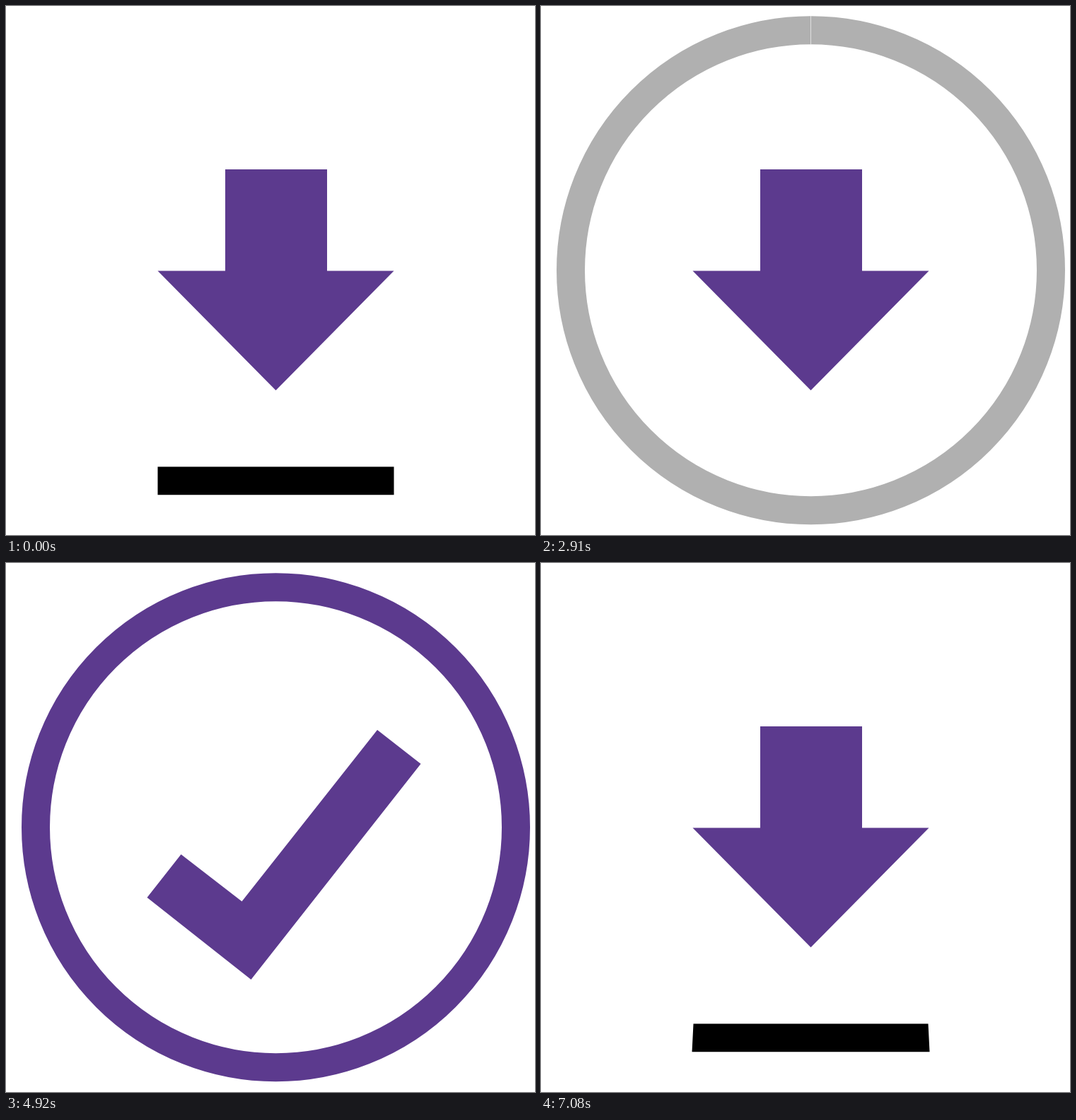
Animation, 748 px wide and 748 px high, one loop 7440 ms. Source, as an HTML page with a canvas:

```html
<!DOCTYPE html>
<html lang="en">
<head>
<meta charset="utf-8">
<title>Download</title>
<style>
  html, body { margin: 0; width: 100%; height: 100%; overflow: hidden; background: #fff; }
  canvas { display: block; }
</style>
</head>
<body>
<canvas width="748" height="748"></canvas>
<script>
const ctx = document.querySelector('canvas').getContext('2d');
const LOOP = 7440, STEP = 30;
const CX = 381.5, CY = 373.7, RADIUS = 339.5, WEIGHT = 40;
const PURPLE = '#5c3a8e', GRAY = 176;

const arrow = new Path2D('M310 231H454V374.5H548.5L381.5 543.5L214.5 374.5H310Z');
const check = new Path2D('M525 213.5L586.5 261.5L346.5 566.5L199.5 450.5L247.5 389.5L333.5 456Z');
const inside = new Path2D();
inside.arc(CX, CY, RADIUS - WEIGHT / 2, 0, 7);

const lerp = (a, b, p) => a + (b - a) * p;
const span = (t, from, to) => Math.min(1, Math.max(0, (t - from) / (to - from)));
const quadIn = p => p * p;
const quadOut = p => 1 - (1 - p) ** 2;
const quadInOut = p => p < .5 ? 2 * p * p : 1 - 2 * (1 - p) ** 2;
const backIn = (p, s) => p * p * ((s + 1) * p - s);
const backOut = (p, s) => 1 - backIn(1 - p, s);

function icon(path, y) {
  ctx.save();
  ctx.clip(inside);
  ctx.translate(0, y);
  ctx.fillStyle = PURPLE;
  ctx.fill(path);
  ctx.restore();
}

// Angles in degrees, clockwise from the bottom of the ring
function ring(color, from, to) {
  const rad = a => (a + 90) * Math.PI / 180;
  ctx.strokeStyle = color;
  ctx.lineWidth = WEIGHT;
  ctx.beginPath();
  ctx.arc(CX, CY, RADIUS, rad(from), rad(to));
  ctx.stroke();
}

// A straight bar at bend 0, a slice of the ring at bend 1
function bar(color, bend, flare = 0) {
  const edge = (half, endY, midY) => {
    const sag = Math.max(.01, midY - endY);
    return { half, endY, r: (half * half + sag * sag) / (2 * sag) };
  };
  const inner = edge(lerp(167, 187.8, bend) - flare, lerp(651.5, 632.2, bend), lerp(651.5, 693.2, bend));
  const outer = edge(lerp(167, 211.3, bend) + flare, lerp(691.3, 664.5, bend), lerp(691.3, 733.2, bend));
  ctx.fillStyle = color;
  ctx.fill(new Path2D(
    `M${CX - inner.half} ${inner.endY}A${inner.r} ${inner.r} 0 0 0 ${CX + inner.half} ${inner.endY}` +
    `L${CX + outer.half} ${outer.endY}A${outer.r} ${outer.r} 0 0 1 ${CX - outer.half} ${outer.endY}Z`));
}

function drawIcons(t) {
  if (t < 4170) {
    const press = t < 1090
      ? 150 * backIn(span(t, 330, 1090), 2.4)
      : 150 * (1 - quadInOut(span(t, 1090, 1580)));
    icon(arrow, press);
    return press;
  }
  if (t < 4620) icon(arrow, 500 * backIn(span(t, 4170, 4590), 1.08));
  else if (t < 5520) icon(check, -580 * (1 - backOut(span(t, 4680, 5170), 1.345)));
  else if (t < 6390) icon(check, 580 * backIn(span(t, 5520, 6355), 1.70158));
  if (t >= 6300) icon(arrow, -500 * (1 - quadOut(span(t, 6300, 7080))));
  return 0;
}

function drawRing(t, press) {
  if (t < 1710) {
    bar('#000', t < 1090 ? span(press, 108, 150) : 1);
  } else if (t < 2535) {
    const p = span(t, 1710, 2535);
    ring('#000', -36 - 144 * backIn(p, 2.4), 36 + 144 * quadIn(p));
  } else if (t < 3590) {
    const v = Math.round(GRAY * span(t, 2510, 2880));
    ring(`rgb(${v},${v},${v})`, -180, 180);
    ctx.fillStyle = 'rgba(255,255,255,.6)';
    ctx.fillRect(CX - .5, 14, 1, 40);
    const sweep = 1 - (1 - span(t, 2910, 3590)) ** 2.55;
    if (sweep > 0) ring(PURPLE, 180, 180 + 360 * sweep);
  } else if (t < 6290) {
    const half = 180 - 144 * quadInOut(span(t, 5770, 6290));
    ring(PURPLE, -half, half);
  } else {
    const flatten = time => quadInOut(span(time, 6240, 6990));
    const flat = flatten(t);
    bar('#000', 1 - flat, flat);
    ctx.globalAlpha = 1 - span(t, 6300, 6510);
    bar(PURPLE, 1 - flatten(t - 60));
    ctx.globalAlpha = 1;
  }
}

function frame() {
  const t = Math.floor(performance.now() % LOOP / STEP) * STEP;
  ctx.fillStyle = '#fff';
  ctx.fillRect(0, 0, 748, 748);
  drawRing(t, drawIcons(t));
  requestAnimationFrame(frame);
}
frame();
</script>
</body>
</html>
```
